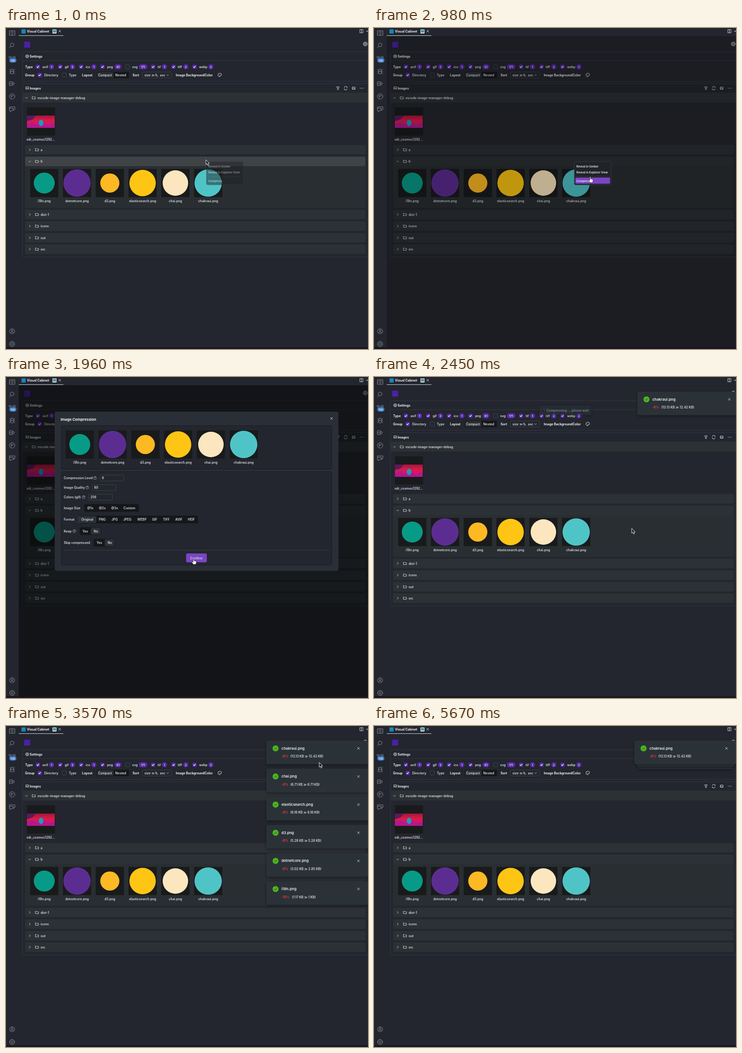
An HTML page for the animation above (5740 ms loop, 795 by 704 pixels).

```html
<!DOCTYPE html>
<html lang="en">
<head>
<meta charset="utf-8">
<title>Image compression</title>
<style>
html, body { margin: 0; width: 100%; height: 100%; overflow: hidden; background: #23262e; }
svg { display: block; }
text { font: 600 6.9px Inter, "DejaVu Sans", sans-serif; fill: #dcdee1; white-space: pre; }
.bold { font-weight: 700; fill: #f0f1f2; }
.mid { text-anchor: middle; }
.head { font-size: 8px; fill: #f0f1f2; }
.small { font-size: 6.1px; fill: #e8eaec; }
.red { fill: #f0383f; font-weight: 700; }
.icon { fill: none; stroke: #c9cccf; stroke-width: 1; stroke-linejoin: round; }
.side .icon { stroke: #858a91; }
.help * { stroke-width: .6; font-size: 5px; }
</style>
</head>
<body>
<svg id="stage" width="795" height="704" viewBox="0 0 795 704"></svg>
<script>
const BG = '#23262e', ROW = '#2c3135', LINE = '#343940', DARK = '#15171b', PURPLE = '#5a29ae', ACCENT = '#7b45c4';
const LOOP = 5740, STEP = 70;

// Drawing helpers; text is placed by its vertical centre.
const rect = (x, y, w, h, fill, r = 0, stroke = 'none', more = '') =>
  `<rect x="${x}" y="${y}" width="${w}" height="${h}" rx="${r}" fill="${fill}" stroke="${stroke}" ${more}/>`;
const text = (x, y, s, cls = '') => `<text x="${x}" y="${y + 2.5}" class="${cls}">${s}</text>`;
const icon = (x, y, d, more = '') => `<path class="icon" transform="translate(${x} ${y})" d="${d}" ${more}/>`;
const dot = (x, y, r, fill) => `<circle cx="${x}" cy="${y}" r="${r}" fill="${fill}"/>`;
const ring = (x, y, r) => `<circle class="icon" cx="${x}" cy="${y}" r="${r}"/>`;
const group = (id, body, more = '') => `<g id="${id}" ${more}>${body}</g>`;
const gear = (x, y, r) => ring(x, y, r) + ring(x, y, r * .4) +
  `<circle class="icon" cx="${x}" cy="${y}" r="${r + .7}" stroke-dasharray="${r * .4} ${r * .385}"/>`;
const close = (x, y) => icon(x, y, 'M-2.5-2.5 2.5 2.5M2.5-2.5-2.5 2.5');
const chevron = (x, y, open) => icon(x, y, open ? 'M-2.3-1 0 1.3 2.3-1' : 'M-1-2.5 1.5 0-1 2.5');
const folder = (x, y) => icon(x, y, 'M-3.5-2.5H-1L0-1.5H3.5V2.5H-3.5Z');
const help = (x, y) => `<g class="help">${ring(x, y, 3.3) + text(x, y - .6, '?', 'mid')}</g>`;
const picture = (x, y) => icon(x, y, 'M-3-3H3V2H-3ZM-3 1-1-1 1 1 3-1');

const files = [
  ['i18n', '#079b87', 23], ['dotnetcore', '#5c2d91', 30], ['d3', '#fdb924', 21],
  ['elasticsearch', '#fec514', 29], ['chai', '#fbe6bf', 28], ['chakraui', '#4fc4c7', 30]
];
const thumbs = (x, y) => files.map(([name, color, r], i) => {
  const left = x + 72 * i;
  return rect(left, y, 62, 62, '#191a1b') + dot(left + 31, y + 31, r, color) +
    text(left + 31, y + 70, name + '.png', 'mid');
}).join('');

const checkbox = (x, y, on) => on
  ? rect(x - 4.5, y - 4.5, 9, 9, PURPLE, 2) + icon(x, y, 'M-2.3 0-.6 1.8 2.4-1.7', 'style="stroke:#fff;stroke-width:1.3"')
  : rect(x - 4.5, y - 4.5, 9, 9, 'none', 2, '#4a4e55', 'stroke-width=".8"');
const badge = (x, y, n) => {
  const w = 7.5 + 3.7 * n.length;
  return rect(x - w / 2, y - 5.5, w, 11, PURPLE, 5.5) + text(x, y, n, 'small mid');
};
const panel = (y, h, title) =>
  rect(36, y, 764, h, 'none', 3, LINE) + text(52, y + 10, title, 'bold');
const rowLabel = (y, name, open) => chevron(52, y, open) + folder(68, y) + text(76, y, name);
const row = (y, name) => rect(42, y - 10.5, 748, 21, ROW, 3) + rowLabel(y, name);

function sidebar() {
  const icons = [
    [11, 'M-6-5H6V5H-6ZM0-5V5M-4-2H-2M-4 1H-2M2-2H4M2 1H4'],
    [38, 'M4-1A4 4 0 1 1-4-1 4 4 0 1 1 4-1M-3 2-6 6'],
    [67, 'M-3-3A2 2 0 1 1-7-3 2 2 0 1 1-3-3M7-3A2 2 0 1 1 3-3 2 2 0 1 1 7-3M-3-3H3'],
    [95, 'M-3-2A3 3 0 0 1 3-2V3A3 3 0 0 1-3 3ZM-3 0H3M-3-2-6-4M3-2 6-4M-3 1H-6M3 1H6M-3 3-6 6M3 3 6 6M0-5V-6'],
    [122, 'M-6-4H1V4H-6ZM1-2H3A2 2 0 0 1 3 2H1M-6 0H1'],
    [150, 'M6 0A6 6 0 1 1-6 0 6 6 0 1 1 6 0M-2-4V4M-2 0 2-2M2-3V0'],
    [178, 'M-6-5H6V1H2V-2H-6ZM-6-5V3H-4V6L-1 3H3V1'],
    [665, 'M5.5 0A5.5 5.5 0 1 1-5.5 0 5.5 5.5 0 1 1 5.5 0M2-1.5A2 2 0 1 1-2-1.5 2 2 0 1 1 2-1.5M-3.5 4Q0-1 3.5 4']
  ];
  return icons.map(([y, d]) => icon(13.5, y, d)).join('') + gear(13.5, 693, 5) +
    rect(7, 66, 16, 10, '#3878c7', 5) + text(15, 71, '196', 'small mid');
}

function tabBar() {
  return rect(34, 3, 9, 9, '#1687c0') + text(46, 7, 'Visual Cabinet', 'bold') +
    rect(102, 3, 9, 9, '#dfe7ea', 1) + rect(103, 4, 7, 6, '#4e9bbd') + icon(106.5, 7, 'M-3 2.5-1 0 1 2 3 .5', 'style="stroke:#387449"') +
    close(118, 7) + rect(28, 16, 98, 1.2, '#b9bcc0') +
    icon(780.5, 7, 'M-3.5-3.5H3.5V3.5H-3.5ZM0-3.5V3.5') + rect(791, 6.5, 4, 1.3, '#c4c7ca');
}

function settings() {
  const types = [
    [70, 80, 100, 'avif', '1'], [119, 129, 146, 'gif', '3'], [165, 175, 193, 'ico', '1'], [212, 222, 246, 'png', '81'],
    [267, 277, 301, 'svg', '171'], [323, 333, 348, 'tif', '1'], [368, 377, 395, 'tiff', '2'], [414, 424, 450, 'webp', '2']
  ];
  return rect(40, 30, 13, 13, '#4b20a8') + gear(789, 35, 3.8) +
    panel(52, 65, 'Settings') + gear(46.5, 62, 3) + rect(36, 71, 759, .8, LINE) +
    text(42, 85, 'Type', 'bold') +
    types.map(([box, label, count, name, n]) => checkbox(box, 85, name != 'svg') + text(label, 85, name) + badge(count, 85, n)).join('') +
    text(42, 103, 'Group', 'bold') + checkbox(74, 103, true) + text(84, 103, 'Directory') +
    checkbox(128, 103) + text(138, 103, 'Type') + text(167, 103, 'Layout', 'bold') +
    rect(199, 96, 71, 14, DARK, 2) + rect(200, 97, 36, 12, '#2c3036', 2) +
    text(217.5, 103, 'Compact', 'mid') + text(252, 103, 'Nested', 'mid') +
    text(278, 103, 'Sort', 'bold') + rect(299.5, 96.5, 64, 13, 'none', 2, '#43474e', 'stroke-width=".8"') +
    text(304, 103, 'size ≫') + icon(331, 103, 'M-2 3V-2.5L-3.5-1M0-2V2.5H3') + text(338, 103, 'asc') + chevron(355, 103, true) +
    text(373, 103, 'Image BackgroundColor', 'bold') +
    icon(469.5, 103, 'M0-4A4 4 0 1 0 0 4Q1 3 0 1.5H3Q4 1 4 0A4 4 0 0 0 0-4M-2 0H-1.5M-1-2H-.5M1.5-1.5H2');
}

function photo() {
  return rect(46, 174, 62, 62, '#191a1b') + rect(46, 192, 61, 27, 'url(#sky)') +
    '<path d="M46 192H66L58 201 46 204Z" fill="#5b1a5e"/><path d="M46 219V211L58 207 68 213 82 209 94 214 107 208V219Z" fill="#b3178c"/>' +
    '<ellipse cx="77" cy="208" rx="5" ry="7" fill="#169fc0"/>' + text(45, 244, 'sdr_cosmos1292...');
}

function images() {
  return panel(122, 380, 'Images') + picture(46.5, 132) +
    icon(729, 132, 'M-3-3H3L1 0V3H-1V0Z') +
    icon(746, 132, 'M-3-1A3 3 0 0 1 3-1V-3M3 1A3 3 0 0 1-3 1V3') +
    picture(763.5, 132.5) + [778, 781, 784].map(x => dot(x, 132, .8, '#c4c7ca')).join('') +
    rect(36, 142, 760, 21.5, ROW) + chevron(45, 153, true) + folder(61, 153) + text(69, 153, 'vscode-image-manager-debug') +
    photo() + row(267, 'a') +
    rect(42, 282, 748, 112.5, '#292e32', 3) + rect(42, 282, 748, 21, ROW, 3) +
    rect(42, 282, 747, 21, '#404346', 3, 'none', 'id="rowHover"') + rowLabel(292.5, 'b', true) +
    group('gallery', thumbs(53, 309)) +
    row(409, 'dist-1') + row(434.5, 'icons') + row(460, 'out') + row(485, 'src');
}

function menu() {
  return rect(440, 293, 81, 51, '#202327', 3, '#3a3e43', 'stroke-width=".8"') +
    rect(442, 328, 76.5, 13.5, ACCENT, 2, 'none', 'id="menuHover"') +
    text(444.5, 303, 'Reveal in Seeker', 'small') + text(444.5, 316, 'Reveal in Explorer View', 'small') +
    rect(443, 325, 75, .7, '#3c4046') + text(444.5, 335, 'Compress', 'small');
}

const segmented = (x, y, w, options, selected) => rect(x, y - 8.5, w, 17, DARK, 3) +
  options.map(([cx, label]) => (label == selected ? rect(cx - label.length * 1.6 - 8, y - 7.5, label.length * 3.2 + 15, 15, '#2d3138', 2) : '') +
    text(cx, y, label, 'mid')).join('');
const field = (y, label, helpX, value) => text(127, y, label) + help(helpX, y) +
  rect(helpX + 11, y - 6.5, 52, 13, '#23262d', 2, '#464a51', 'stroke-width=".8"') + text(helpX + 15, y, value);

function modal() {
  return rect(107, 76, 623, 349, '#2a2e37', 4) + text(120, 93.5, 'Image Compression', 'head bold') + close(715, 91) +
    rect(121.5, 106.5, 594, 96, BG, 3, '#191c20') + thumbs(131, 117) +
    rect(121.5, 207.5, 594, 205, BG, 3, '#191c20') +
    field(221.5, 'Compression Level', 195.5, 9) + field(242.5, 'Image Quality', 178.5, 80) + field(263.5, 'Colors (gif)', 170.5, 256) +
    text(127, 287, 'Image Size') + segmented(172, 287, 120, [[185, '@1x'], [211.5, '@2x'], [238.5, '@3x'], [271, 'Custom']]) +
    text(127, 312.5, 'Format') + segmented(162, 312.5, 260, [[178.5, 'Original'], [211.5, 'PNG'], [238.5, 'JPG'], [266.5, 'JPEG'],
      [298.5, 'WEBP'], [326.5, 'GIF'], [352, 'TIFF'], [379.5, 'AVIF'], [407, 'HEIF']], 'Original') +
    text(127, 338, 'Keep') + help(150, 338) + segmented(162, 338, 47, [[174, 'Yes'], [197.5, 'No']], 'No') +
    text(127, 363.5, 'Skip compressed') + segmented(192.5, 363.5, 47, [[205, 'Yes'], [228, 'No']], 'No') +
    rect(127, 379.5, 583, .8, '#42464d') + rect(395.5, 387, 45.5, 19.5, ACCENT, 3) + text(418, 397, 'Confirm', 'mid');
}

const toasts = [
  ['chakraui', 6, '13.13 KB ≫ 12.42 KB'], ['chai', 0, '6.71 KB ≫ 6.71 KB'], ['elasticsearch', 0, '6.16 KB ≫ 6.16 KB'],
  ['d3', 0, '5.28 KB ≫ 5.28 KB'], ['dotnetcore', 6, '3.02 KB ≫ 2.85 KB'], ['i18n', 15, '1.17 KB ≫ 1 KB']
];
const toast = ([name, percent, size], i) => group('toast' + i,
  rect(572, 32, 224, 51.5, '#2c3138', 4, 'none', 'filter="url(#shadow)"') + dot(592, 49, 6.6, '#4cb51e') +
  icon(592, 49, 'M-2.7 0-.7 2 2.8-1.8', 'style="stroke:#263a20"') + text(605, 49, name + '.png', 'head') + close(774, 49) +
  text(605, 66.5, `-${percent}%`, 'red') + text(percent > 9 ? 628 : 624.5, 66.5, `(${size})`));

const $ = id => document.getElementById(id);
$('stage').innerHTML = `<defs>
  <linearGradient id="sky" x2="0" y2="1"><stop stop-color="#a3153f"/><stop offset=".4" stop-color="#dc1b45"/><stop offset="1" stop-color="#c0169b"/></linearGradient>
  <filter id="shadow" x="-10%" y="-30%" width="120%" height="160%"><feDropShadow dx="0" dy="2" stdDeviation="3" flood-opacity=".4"/></filter></defs>` +
  rect(0, 0, 795, 704, BG) + group('side', sidebar(), 'class="side"') + tabBar() + settings() + images() +
  rect(28, 18, 767, 683, '#000', 0, 'none', 'id="mask"') + rect(0, 700.5, 795, 3.5, '#191521') +
  group('modal', modal()) + group('menu', menu()) +
  group('message', rect(363, 63, 114, 20, '#2c3138', 3, 'none', 'filter="url(#shadow)"') +
    icon(372, 73, 'M0-3A3 3 0 0 1 3 0', 'style="stroke:#7b45c4"') + text(379, 73, 'Compressing..., please wait')) +
  toasts.map(toast).reverse().join('') +
  '<path id="arrow" d="M0 0V10.5L2.4 8.4 4.2 12.4 6 11.6 4.3 7.8H7.6Z" fill="#17191c" stroke="#eee" stroke-width="1"/>' +
  '<path id="hand" d="M-1 1Q0-.8 1 1V5L5 6Q6.5 6.5 6 9L5 13H-.5L-4 8.5Q-4 6.5-2.5 7.5L-1 8.5Z" fill="#fff" stroke="#222" stroke-width=".8"/>';

const span = (t, a, b) => Math.min(1, Math.max(0, (t - a) / (b - a)));
const ease = x => x * x * (3 - 2 * x);
const pulse = (t, a, b, c, d) => ease(span(t, a, b)) * (1 - ease(span(t, c, d)));
const mix = (a, b, k) => a + (b - a) * k;

// Pointer stops: time, x, y.
const stops = [
  [0, 439, 289], [280, 439, 289], [700, 475, 326], [1300, 475, 326], [1820, 412, 398], [2030, 412, 398], [2450, 566, 332],
  [2600, 566, 332], [3010, 661, 124], [3220, 680, 70], [3600, 688, 80], [4410, 694, 360], [4620, 694, 360],
  [5040, 700, 424], [5400, 810, 480], [LOOP, 810, 480]
];
function pointerAt(t) {
  const n = stops.findIndex(s => s[0] > t), [t0, x0, y0] = stops[n - 1], [t1, x1, y1] = stops[n];
  const k = ease(span(t, t0, t1));
  return [mix(x0, x1, k), mix(y0, y1, k)];
}

const fade = (id, opacity) => $(id).setAttribute('opacity', opacity);
const move = (id, transform) => $(id).setAttribute('transform', transform);

function draw(t) {
  const [x, y] = pointerAt(t);
  const inMenu = t < 1140 && x > 441 && y > 294;
  const onButton = t > 1700 && t < 2100;
  fade('arrow', +!(inMenu || onButton));
  fade('hand', +(inMenu || onButton));
  move('arrow', `translate(${x} ${y})`);
  move('hand', `translate(${x} ${y})`);

  fade('rowHover', +(t < 1140 && !inMenu));
  fade('menu', pulse(t, -140, 140, 1000, 1140));
  fade('menuHover', +inMenu);
  $('menuHover').setAttribute('y', y < 309 ? 296 : y < 323 ? 309.5 : 328);

  fade('mask', .48 * pulse(t, 880, 1080, 2030, 2240));
  const shown = pulse(t, 1000, 1260, 2030, 2240), scale = mix(.2, 1, shown);
  fade('modal', shown);
  move('modal', `translate(475 331) scale(${scale}) translate(-475 -331)`);

  const message = pulse(t, 2030, 2200, 2370, 2530);
  fade('message', message);
  move('message', `translate(0 ${t < 2300 ? 10 * (message - 1) : 0})`);
  fade('gallery', t > 2800 && t < 3200 ? mix(.1, 1, span(t, 2870, 3150)) : 1);

  // The stack slides in, fans out under the pointer, then folds again.
  const slide = 240 * (1 - span(t, 2240, 2500)) ** 2.2;
  const open = pulse(t, 3220, 3520, 5110, 5410);
  toasts.forEach((_, i) => {
    const depth = Math.min(i, 2), k = mix(1 - .035 * depth, 1, open);
    fade('toast' + i, t < 2240 ? 0 : i ? (i < 3 ? span(t, 2480, 2700) : open) : 1);
    move('toast' + i, `translate(${slide + 684 * (1 - k)} ${mix(5.5 * depth, 61.7 * i, open)}) scale(${k} 1)`);
  });
}

function tick(now) {
  draw(Math.floor(now % LOOP / STEP) * STEP);
  requestAnimationFrame(tick);
}
requestAnimationFrame(tick);
</script>
</body>
</html>
```
